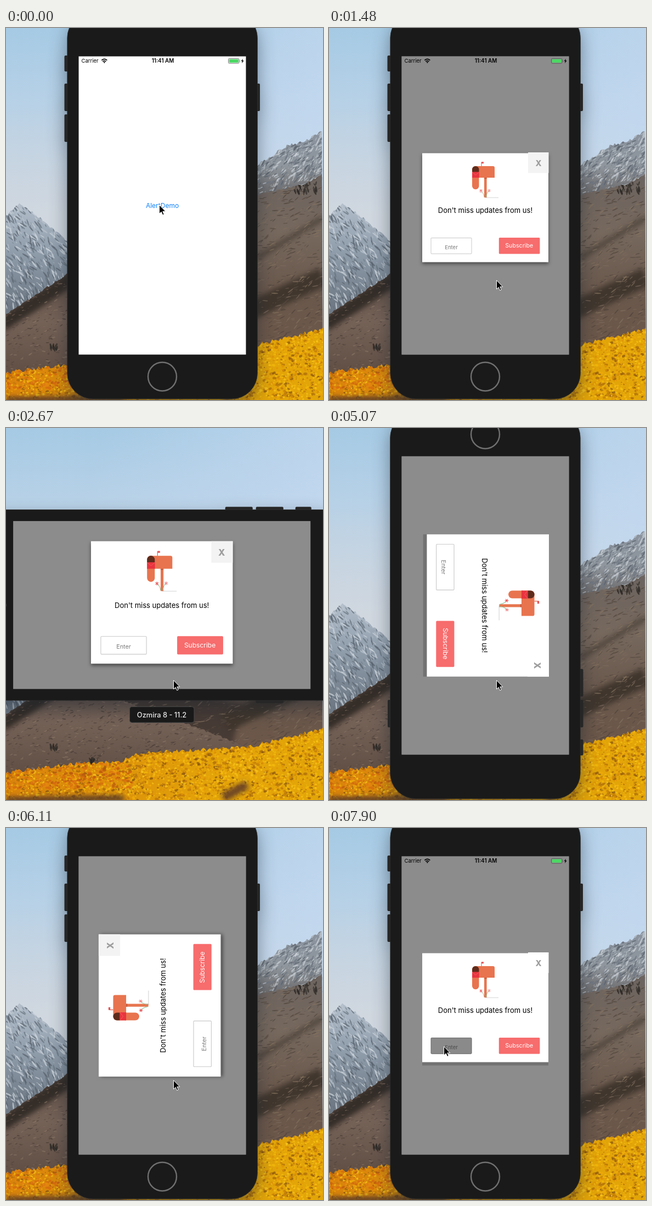
Animation of 578x676 px, one loop 8 s. Source, as an HTML page with a canvas:

```html
<!DOCTYPE html>
<html lang="en">
<head>
<meta charset="utf-8">
<title>Alert demo</title>
<style>
  html, body { margin: 0; width: 578px; height: 676px; overflow: hidden; background: #b4d0e6; }
  canvas, svg { position: absolute; left: 0; top: 0; display: block; }
  text { font-family: Inter, Roboto, "Liberation Sans", sans-serif; }
  .mid { text-anchor: middle; }
  #device { filter: drop-shadow(0 14px 16px rgba(20, 30, 45, .45)); }
  #soft { filter: drop-shadow(0 3px 3px rgba(0, 0, 0, .5)); }
</style>
</head>
<body>
<canvas id="land" width="578" height="676"></canvas>
<svg width="578" height="676" viewBox="0 0 578 676">
  <defs>
    <clipPath id="glass"><rect x="132.5" y="51.5" width="305" height="542"/></clipPath>
  </defs>

  <g id="device"><g id="phone">
    <g fill="#262626">
      <rect x="106.5" y="50" width="8" height="29" rx="2"/>
      <rect x="106.5" y="101" width="8" height="50" rx="2"/>
      <rect x="106.5" y="157" width="8" height="50" rx="2"/>
      <rect x="455" y="101" width="8" height="50" rx="2"/>
    </g>
    <rect x="111.8" y="-28.8" width="346.6" height="702.8" rx="47" fill="#1a1a1a" stroke="#303030" stroke-width=".8"/>
    <circle cx="285" cy="633.5" r="26" fill="none" stroke="#707070" stroke-width="2.4"/>

    <g clip-path="url(#glass)">
      <rect x="132" y="51" width="306" height="543"/>
      <g id="content">
        <rect class="fill" fill="#fff"/>
        <text id="open" class="mid" y="4.5" font-size="12" fill="#1283fb">AlertDemo</text>
        <rect class="fill" id="dim"/>

        <g id="alert"><g transform="translate(-285 -326.5)">
          <rect id="flat" x="170" y="229" width="230" height="202.5" fill="#727272"/>
          <rect id="soft" x="170" y="227.5" width="230" height="198" fill="#fff"/>
          <rect id="closeBox"/>
          <text class="mid" x="382" y="251.2" font-size="14.5" font-weight="800" fill="#9d9d9d">X</text>

          <path d="M285 308.3H309" stroke="#d5d5d5"/>
          <path d="M278 251V243.7" stroke="#e2624f" stroke-width="1.1"/>
          <path d="M278 243.3h4v3h-4z" fill="#e2575a"/>
          <path d="M283 271h4.6v37h-4.6z" fill="#e6754f"/>
          <path d="M283 271h4.6v3h-4.6z" fill="#c95b3c"/>
          <path d="M261 257a6 6 0 0 1 6-6H299a3 3 0 0 1 3 3V272H261z" fill="#e8744f"/>
          <path d="M261 270h12.5V287a6.2 6.2 0 0 1-12.5 0z" fill="#e8744f"/>
          <path d="M261 262V257.2a6.2 6.2 0 0 1 12.5 0V262z" fill="#5f2c1c"/>
          <path d="M261 261.5h12.8v10.5h-12.8z" fill="#e9343f"/>
          <path d="M261 262l6.4 5 6.4-5" fill="none" stroke="#f0645f" stroke-width=".8"/>
          <path d="M278 297q4 3 5 10M291.5 296q-4 3-5 11" fill="none" stroke="#8fbf94" stroke-width=".9"/>
          <path id="star" d="M274.5 294.3l5 3.4M274.5 297.7l5-3.4M277 293v6" stroke="#e65658"/>
          <use href="#star" x="15" y="-.5" opacity=".65"/>

          <text id="title" class="mid" x="285" y="335.6">Don't miss updates from us!</text>
          <rect id="field" x="186" y="381.4" width="74" height="28.8" rx="1.2"/>
          <text id="enter" class="mid" x="223" y="401.6" font-size="9.6">Enter</text>
          <rect x="309.8" y="381" width="74.6" height="29.5" rx="1.5" fill="#f76c6d"/>
          <text class="mid" x="346.7" y="399.3" font-size="10.7" fill="#fff">Subscribe</text>
        </g></g>
      </g>

      <g id="status">
        <text x="137.5" y="63.3" font-size="9.5">Carrier</text>
        <path d="M174.3 58.6q5-4.6 10 0M176.2 60.9q3.1-2.7 6.2 0" fill="none" stroke="#000" stroke-width="1.7"/>
        <path d="M177.6 62.2q1.7-1.4 3.4 0L179.3 64z"/>
        <text class="mid" x="286" y="63.3" font-size="9.9" font-weight="600">11:41 AM</text>
        <rect x="405.5" y="55.5" width="19.5" height="8.8" rx="1.8" fill="none" stroke="#555" stroke-width=".8"/>
        <rect x="406.7" y="56.7" width="17.1" height="6.4" rx=".8" fill="#4cd964"/>
        <path d="M426 58.4q1.5 1.5 0 3z" fill="#444"/>
        <path d="M432 55.7l-3.4 4.6h2.2l-.9 3.9 3.7-4.9h-2.3z"/>
      </g>
    </g>
  </g></g>

  <g id="tag">
    <rect x="225.5" y="506.5" width="117.5" height="28.8" rx="4" fill="#191919" stroke="#484848"/>
    <text class="mid" x="284" y="526.2" font-size="12.8" font-weight="500" fill="#e9e9e9">Ozmira 8 - 11.2</text>
  </g>

  <path id="cursor" d="M0 0V16L3.7 12.7 6.2 18.3 8.7 17.2 6.3 11.7H11.3Z" stroke="#fff"/>
</svg>

<script>
const LOOP = 8000;
const BEAT = 149;                      // the picture changes once per beat, in ms
const SHOW = 2, PRESS = 53;            // beats: alert opens, field is pressed
const TURNS = [16, 34, 38, 41];        // beats of the quarter turns

// the pointer glides between these: beat, x, y
const STOPS = [
  [3, 279.5, 321.5], [5, 439, 402], [8, 332, 402], [10, 305.5, 458.5],
  [47, 305.5, 458.5], [49, 350, 289], [50, 217, 409], [52, 209.5, 397]
];

const $ = id => document.getElementById(id);
const set = (el, attrs) => { for (const k in attrs) el.setAttribute(k, attrs[k]); };
const mix = (a, b, p) => a + (b - a) * p;
const ramp = (v, a, b) => Math.min(1, Math.max(0, (v - a) / (b - a)));
const easeOut = p => 1 - (1 - p) ** 3;
const spring = u => u > 0 ? 1 - Math.exp(-.9 * u) * Math.cos(.55 * u) : 0;

function pointer(n) {
  const i = STOPS.findIndex(s => s[0] > n);
  if (i < 0) return STOPS.at(-1).slice(1);
  const b = STOPS[i], a = STOPS[Math.max(0, i - 1)];
  const p = easeOut(ramp(n, a[0], b[0]));
  return i ? [mix(a[1], b[1], p), mix(a[2], b[2], p)] : b.slice(1);
}

function render(t) {
  const n = Math.floor((t + 14) / BEAT);
  const turn = 90 * TURNS.filter(k => n >= k).length;
  const sideways = turn % 180 > 0;
  const wide = ramp(n, TURNS[0], TURNS[0] + 2) - ramp(n, TURNS[3], TURNS[3] + 2);
  const shown = ramp(n, SHOW, SHOW + 3);
  const size = mix(1, 1.124, wide);
  const w = mix(306, 543, wide), h = mix(543, 306, wide);
  const flat = (n >= TURNS[1] && n < TURNS[3]) || n >= PRESS - 2;
  const pressed = n >= PRESS;
  const nudge = sideways ? -.8 : 0;

  set($('phone'), { transform: `translate(${nudge} ${nudge}) rotate(${turn} 285 322.5)` });
  set($('content'), { transform: `translate(285 322.5) rotate(${-90 * wide})` });
  for (const el of document.querySelectorAll('.fill')) {
    set(el, { x: -w / 2, y: -h / 2, width: w, height: h });
  }
  set($('dim'), { 'fill-opacity': .45 * shown });
  set($('open'), { opacity: n === 1 || n === 2 ? .25 : 1 });
  set($('alert'), {
    transform: `translate(0 ${mix(4, -4.7, wide)}) scale(${size * spring(n - SHOW)})`,
    opacity: shown
  });
  set($('title'), { 'font-size': 13 / size });

  const side = mix(37.5, 34.8, wide);
  set($('closeBox'), {
    x: mix(363, 365.2, wide), y: mix(226, 227.5, wide),
    width: side, height: side, fill: flat ? '#fff' : '#f3f3f3'
  });
  set($('flat'), { opacity: flat ? 1 : 0 });
  $('soft').style.filter = flat ? 'none' : '';
  set($('field'), { fill: pressed ? '#8a8a8a' : '#fff', stroke: pressed ? '#666' : '#c9c9c9' });
  set($('enter'), { fill: pressed ? '#4b4b4b' : '#7b7b7b' });

  set($('status'), { opacity: wide ? 0 : 1 });
  set($('tag'), { opacity: sideways ? 1 : 0 });
  set($('cursor'), { transform: `translate(${pointer(n)})` });
}

function paintLand() {
  const c = $('land').getContext('2d');
  const W = 578, H = 676;
  let seed = 7;
  const rnd = () => (seed = seed * 16807 % 2147483647) / 2147483647;
  const pick = list => list[rnd() * list.length | 0];

  const grad = (x0, y0, x1, y1, ...colors) => {
    const g = c.createLinearGradient(x0, y0, x1, y1);
    colors.forEach((k, i) => g.addColorStop(i / (colors.length - 1), k));
    return g;
  };
  // fills everything below a rough line through a few points, then clips to it
  const ridge = (fill, rough, points, detail) => {
    const path = new Path2D();
    points.slice(1).forEach(([x1, y1], i) => {
      const [x0, y0] = points[i];
      for (let x = x0; x <= x1; x += 3) {
        path.lineTo(x, mix(y0, y1, (x - x0) / (x1 - x0)) + rough * (rnd() - .5));
      }
    });
    path.lineTo(points.at(-1)[0], H);
    path.lineTo(points[0][0], H);
    c.fillStyle = fill;
    c.fill(path);
    c.save();
    c.clip(path);
    detail();
    c.restore();
  };
  const grain = (count, x0, y0, x1, y1, colors, rx, ry, tilt = 0) => {
    c.globalAlpha = .7;
    for (let i = 0; i < count; i++) {
      const s = .3 + rnd();
      c.fillStyle = pick(colors);
      c.beginPath();
      c.ellipse(mix(x0, x1, rnd()), mix(y0, y1, rnd()), rx * s, ry * s, tilt + rnd() - .5, 0, 7);
      c.fill();
    }
    c.globalAlpha = 1;
  };
  const streak = (x0, y0, x1, y1, width, color) => {
    c.filter = 'blur(5px)';
    c.strokeStyle = color;
    c.lineWidth = width;
    c.beginPath();
    c.moveTo(x0, y0);
    c.lineTo(x1, y1);
    c.stroke();
    c.filter = 'none';
  };
  const firs = (x, y, r) => grain(r * 2, x - r, y - r / 2, x + r, y + r / 2, ['#26231f', '#34302b'], 1.6, 5);

  c.fillStyle = grad(0, 0, 0, 340, '#a6cae4', '#b4d0e7', '#c5d4e2', '#d0d7df');
  c.fillRect(0, 0, W, H);
  c.fillStyle = grad(180, 0, W, 130, 'rgba(196,217,240,0)', 'rgba(196,217,240,.75)');
  c.fillRect(0, 0, W, 300);

  ridge(grad(0, 315, 0, 500, '#b3bfcb', '#8f9caa', '#6f7a86'), 5,
    [[0, 342], [24, 318], [66, 348], [115, 390]], () => {
      grain(520, 0, 320, 115, 510, ['#cfd7df', '#b9c4cf', '#66727e', '#57626d'], 1.2, 6, -.6);
    });
  ridge(grad(0, 200, 0, 300, '#8a939e', '#8f969d', '#6e6c6c'), 5,
    [[450, 254], [512, 214], [546, 206], [W, 187]], () => {
      grain(560, 450, 190, W, 305, ['#ccd2d8', '#b4bcc4', '#5a626b', '#6d7680'], 1.2, 5, .8);
    });

  ridge(grad(0, 270, 0, 580, '#6c6460', '#76685d', '#6a584c', '#6c5749'), 4,
    [[150, 470], [458, 304], [540, 285], [W, 266]], () => {
      streak(458, 418, W, 345, 9, '#4f453c');
      streak(200, 500, 420, 545, 90, '#473b35');
      streak(400, 535, W, 452, 34, '#40362d');
      grain(1600, 180, 270, W, 590, ['#574a41', '#83725f', '#4d423a', '#7b695c'], 5, .8, -.4);
      firs(546, 290, 20);
    });

  ridge(grad(0, 447, 0, 620, '#5e4f46', '#756257', '#625046'), 4,
    [[0, 520], [112, 447], [200, 490], [470, 590]], () => {
      streak(-10, 540, 125, 452, 26, '#342d28');
      grain(1300, 0, 460, 450, 620, ['#55473e', '#897565', '#665349', '#463b34'], 3, .8, -.2);
      firs(88, 580, 7);
      firs(160, 605, 7);
    });

  ridge(grad(0, 0, W, 0, '#d8820c', '#dc920a', '#e3a409', '#e2a508'), 7,
    [[0, 626], [110, 612], [212, 605], [240, 591], [440, 580], [W, 547]], () => {
      grain(1500, 0, 545, W, H, ['#a8680c', '#c07a0a', '#865311'], 3, 2);
      grain(3800, 0, 545, W, H, ['#f6bc0c', '#fac71c', '#f0aa09', '#e09107'], 2, 1.6);
      grain(420, 0, 608, 230, 655, ['#d8680f', '#e4830f', '#b9570f'], 3, 2);
      streak(396, 672, 440, 648, 16, '#6b4426');
      streak(0, H, 215, 673, 10, '#4b3029');
    });
}

paintLand();
const start = performance.now();
(function tick() {
  render((performance.now() - start) % LOOP);
  requestAnimationFrame(tick);
})();
</script>
</body>
</html>
```
